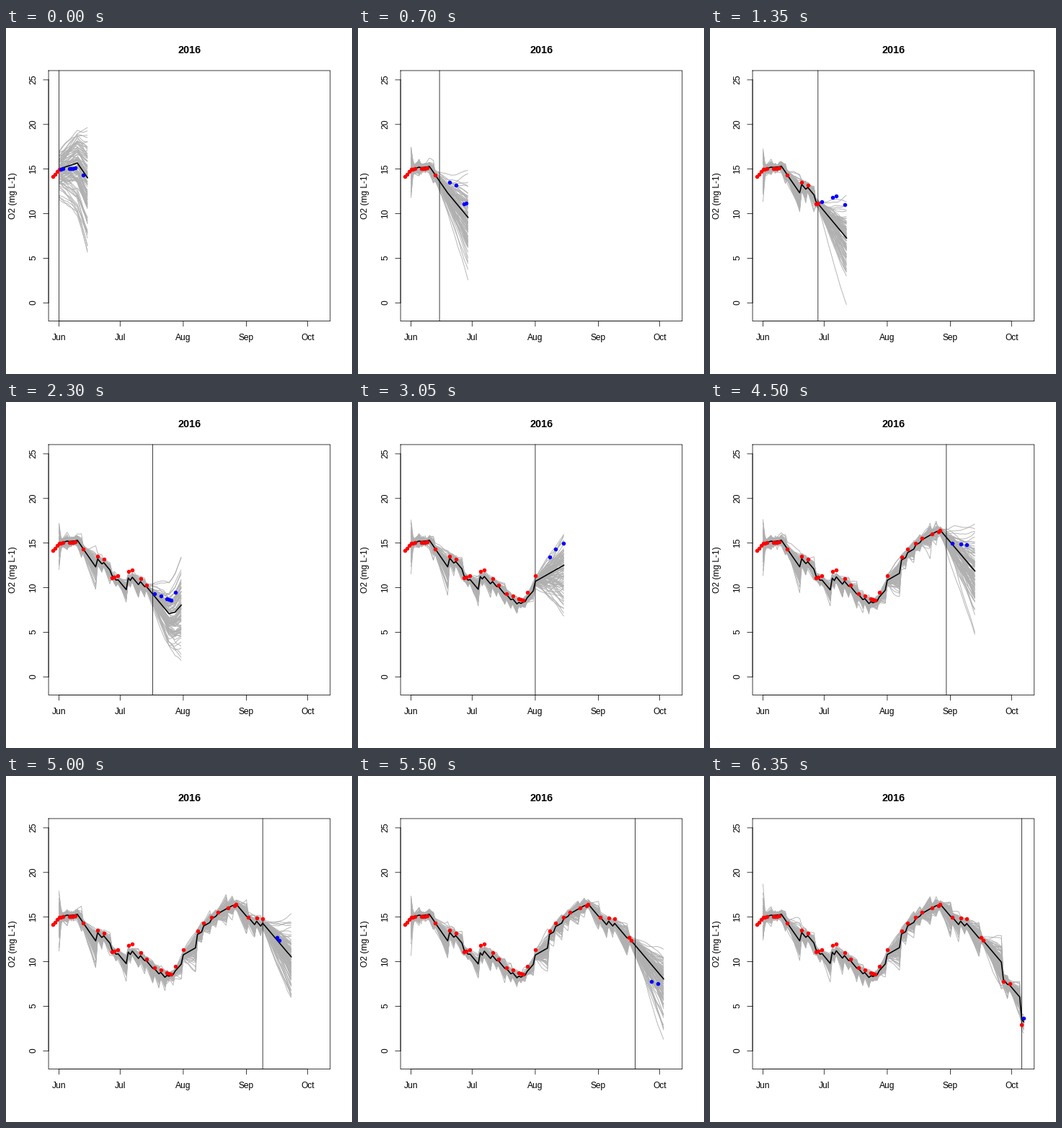
Write a matplotlib script that moves like this. It is 480 by 480 pixels and loops after 6.4 s.

```python
import math

import matplotlib.pyplot as plt
import numpy as np
from matplotlib.animation import FuncAnimation
from matplotlib.collections import LineCollection

SIZE, DPI = 480, 72
LEFT, RIGHT, TOP, BOTTOM = 59.04, 449.76, 59.04, 406.56
DAYS, HORIZON, MEMBERS = 128, 14, 100
OBS_VAR = .2

# Two visits a week, a day later from late August, with a few gaps and extras
weekly = {d + (d > 80) for d in (math.ceil(3.5 * n + 1) for n in range(37))}
missed = {15, 33, 64, 90, 104, 111, 114, 125}
extra = {*range(-3, 3), 6, 7, 27, 34, 53, 55, 87, 108, 127}
visits = np.array(sorted(weekly - missed | extra))

# Turning points of the measured O2
turns = [(-3, 14.15), (0, 15), (8, 15.1), (12, 14.3), (22, 13.2), (26, 11.1),
         (36, 12), (47, 9.3), (55, 8.6), (61, 11.3), (71, 14.3), (78, 15.5),
         (87, 16.4), (93, 15), (100, 14.8), (108, 12.4), (118, 7.8),
         (121, 7.5), (127, 2.9), (128, 3.7)]
observed = np.interp(visits, *zip(*turns))
measured = dict(zip(visits, observed))

# Daily change of the free model, each valid up to a given day
phases = [(9, .075), (18, -.33), (54, -.275), (57, .06), (61, .26),
          (87, .13), (DAYS, -.27)]


def drift(day):
    return next(rate for end, rate in phases if day <= end)


def simulate(now):
    """Ensemble filter up to `now`, then a free forecast."""
    rng = np.random.default_rng(500 + now)
    last = min(now + HORIZON, DAYS)
    mean = np.full(last + 1, 15.0)
    dev = np.empty((last + 1, MEMBERS))
    dev[0] = rng.normal(0, 1.1, MEMBERS)
    rate = rng.normal(0, .12, MEMBERS)
    for day in range(1, last + 1):
        rate = .85 * rate + rng.normal(0, .065, MEMBERS)
        mean[day] = mean[day - 1] + drift(day)
        dev[day] = 1.05 * dev[day - 1] + rate
        if day <= now and day in measured:
            var = dev[day].var()
            mean[day] += var / (var + OBS_VAR) * (measured[day] - mean[day])
            dev[day] = .2 * dev[day] + rng.normal(0, .2, MEMBERS)
    dev *= np.where(dev < 0, 1.15, .92)
    return np.arange(last + 1), mean, mean[:, None] + dev


def px(day):
    return LEFT + (RIGHT - LEFT) * (day / DAYS + .04) / 1.08


def py(value):
    return BOTTOM - (BOTTOM - TOP) * (value + 2.04) / 28.08


plt.rcParams["font.family"] = "Liberation Sans"
fig = plt.figure(figsize=(SIZE / DPI, SIZE / DPI), dpi=DPI, facecolor="white")
page = fig.add_axes([0, 0, 1, 1])
page.set(xlim=(0, SIZE), ylim=(SIZE, 0))
page.axis("off")


def stroke(xs, ys, color="black", lw=.75, **kw):
    return page.plot(xs, ys, color=color, lw=lw, snap=False, **kw)[0]


def label(x, y, text, size=12, **kw):
    page.text(x, y, text, fontsize=size, ha="center", va="baseline",
              rotation_mode="anchor", **kw)


stroke([LEFT, RIGHT, RIGHT, LEFT, LEFT], [TOP, TOP, BOTTOM, BOTTOM, TOP])
months = {"Jun": 0, "Jul": 30, "Aug": 61, "Sep": 92, "Oct": 122}
stroke([px(0), px(122)], [BOTTOM] * 2)
for name, day in months.items():
    stroke([px(day)] * 2, [BOTTOM, BOTTOM + 7.2])
    label(px(day), 433, name)
stroke([LEFT] * 2, [py(0), py(25)])
for level in range(0, 26, 5):
    stroke([LEFT - 7.2, LEFT], [py(level)] * 2)
    label(41.5, py(level) - .5, str(level), rotation=90)
label(13, 232.8, "O2 (mg L-1)", rotation=90)
label((LEFT + RIGHT) / 2, 35, "2016", 14.4, weight="bold")

members = LineCollection([], colors="#b0b0b0", linewidths=.9, zorder=2)
page.add_collection(members, autolim=False)
mean_line = stroke([], [], lw=1.6, zorder=3)
now_line = stroke([], [], zorder=4)
dots = dict(ls="", marker="o", ms=5.5, mew=0, zorder=5)
past = stroke([], [], "red", **dots)
future = stroke([], [], "blue", **dots)


def draw(now):
    days, mean, ens = simulate(now)
    x = px(days)
    members.set_segments([np.column_stack([x, py(m)]) for m in ens.T])
    mean_line.set_data(x, py(mean))
    now_line.set_data([px(now)] * 2, [TOP, BOTTOM])
    done = visits <= now
    ahead = ~done & (visits <= now + HORIZON)
    for line, pick in ((past, done), (future, ahead)):
        line.set_data(px(visits[pick]), py(observed[pick]))
    return members, mean_line, now_line, past, future


anim = FuncAnimation(fig, draw, frames=DAYS, interval=50, repeat=True,
                     repeat_delay=0, blit=False)
plt.show()
```
